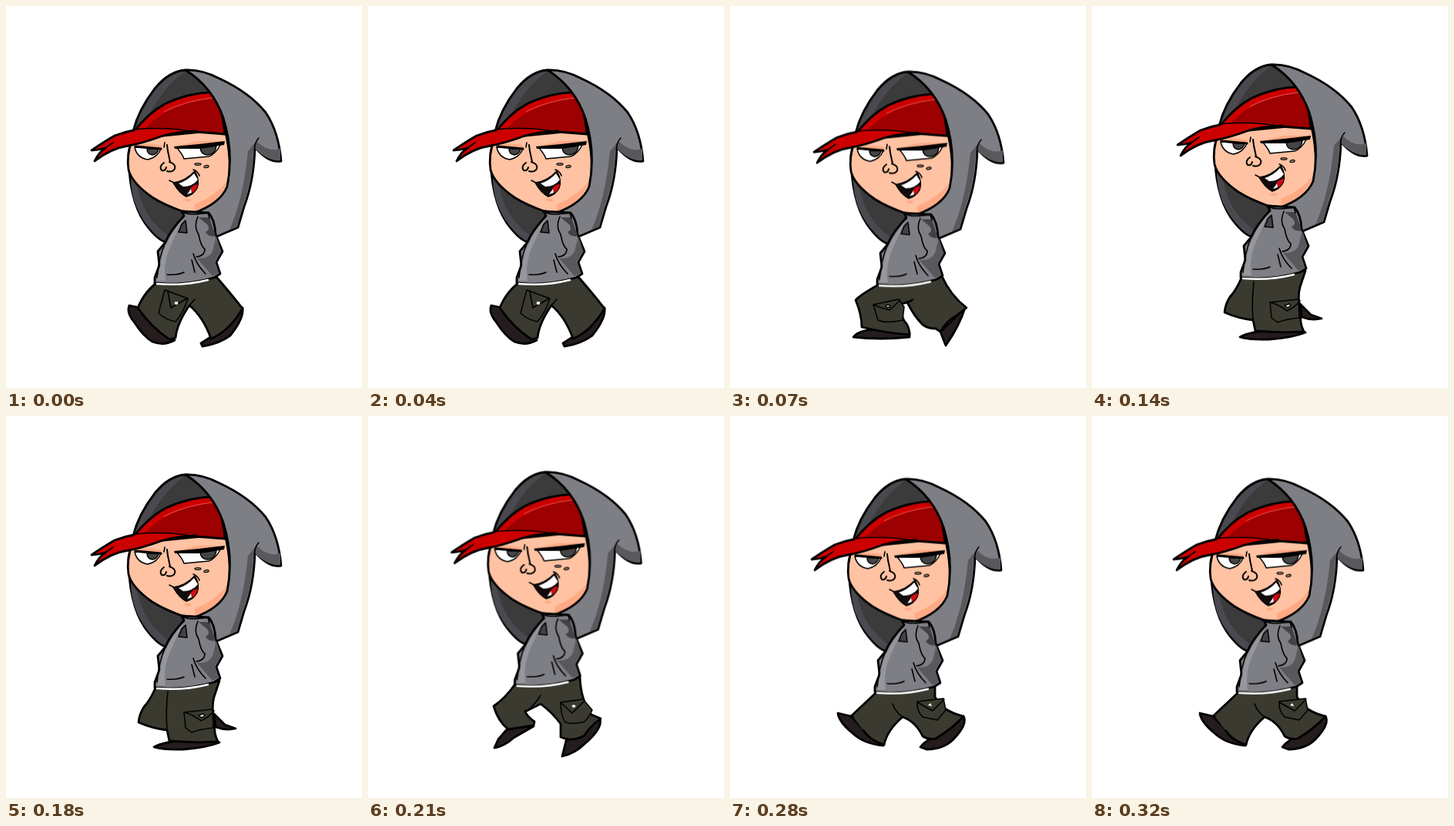
An HTML page that plays this animation: 462 px wide and 495 px high, repeating every 350 ms.

```html
<!DOCTYPE html>
<html lang="en">
<head>
<meta charset="utf-8">
<title>Walk cycle</title>
<style>
html, body { margin: 0; width: 100%; height: 100%; overflow: hidden; background: #fff; }
svg { display: block; }
path, ellipse { stroke-linejoin: round; stroke-linecap: round; }
.ink { stroke: #000; stroke-width: 2.8; }
.thin { stroke: #000; stroke-width: 1.5; }
.line { fill: none; stroke: #000; stroke-width: 1.6; }
.pants { fill: #3b3a30; }
.shoe { fill: #251c1e; }
.cloth { fill: #7e7e85; }
.shade { fill: #59595d; }
.skin { fill: #ffc2a2; }
.blush { fill: #ffa985; }
.white { fill: #fff; }
.red { fill: #cc0000; }
.dark-red { fill: #9c0000; }

.body { animation: bob 350ms step-end infinite; }
@keyframes bob {
  0% { transform: translate(0, 0); }
  20% { transform: translate(-2px, 2.3px); }
  40% { transform: translate(0, -7px); }
  60% { transform: translate(-2.5px, -10.3px); }
  80% { transform: translate(-5px, -1.3px); }
}
.pose { opacity: 0; animation: show 350ms step-end infinite; animation-delay: calc((var(--i) - 5) * 70ms); }
@keyframes show {
  0% { opacity: 1; }
  20%, 100% { opacity: 0; }
}
</style>
</head>
<body>
<svg width="462" height="495" viewBox="0 0 462 495">

  <!-- legs: wide stride -->
  <g class="pose" style="--i:0">
    <path class="shoe ink" d="M160 388Q156 397 166 409Q178 428 190 435Q205 441 219 433L212 428L174 391Z"/>
    <path class="shoe ink" d="M307 391Q309 405 291 427Q276 438 255 441L253 437L267 428Z"/>
    <path class="pants ink" d="M197 358Q181 368 171 391Q188 416 212 432L220 430Q222 411 238 388Q256 403 266 431Q289 422 307 392Q292 373 273 351L250 353Z"/>
    <path class="line" d="M238 388L245 380"/>
    <path class="pants thin" d="M206 368L236 379Q230 398 220 409Q208 407 198 398Z"/>
    <path class="line" d="M210 370L214 391L235 379"/>
    <ellipse class="white" cx="221" cy="385" rx="2.4" ry="2"/>
  </g>

  <!-- legs: heel down -->
  <g class="pose" style="--i:1">
    <path class="shoe ink" d="M305 391Q298 414 280 440L273 422L288 408Z"/>
    <path class="pants ink" d="M275 350Q286 375 307 391L294 401Q281 408 273 422L267 418Q257 418 250 413Q239 402 230 384L230 362Z"/>
    <path class="shoe ink" d="M160 429Q168 418 205 418L233 423V429Q195 433 160 429Z"/>
    <path class="pants ink" d="M193 361Q171 373 163 381Q171 400 171 416Q203 424 233 426Q233 415 226 408Q219 393 222 386Q242 382 272 360L270 350Z"/>
    <path class="pants" d="M250 356L273 353L280 374L236 384Z"/>
    <path class="pants thin" d="M186 387L219 380L226 390L224 407Q203 412 192 407Z"/>
    <path class="line" d="M186 387Q197 392 207 394L221 381"/>
    <ellipse class="white thin" cx="205" cy="389" rx="2.8" ry="1.5"/>
  </g>

  <!-- legs: passing -->
  <g class="pose" style="--i:2">
    <path class="shoe ink" d="M270 386L284 400L298 405Q285 408 272 403Z"/>
    <path class="shoe ink" d="M192 429Q204 422 240 419L277 423Q260 430 230 432Q206 433 192 429Z"/>
    <path class="pants ink" d="M194 352Q188 367 179 377Q173 386 172 397Q190 405 209 407L212 421Q245 424 275 422Q269 410 271 397Q266 377 270 364L277 343Z"/>
    <path class="line" d="M210 357Q207 382 209 407"/>
    <path class="pants thin" d="M231 384L268 380L269 404Q250 406 241 410L233 404Z"/>
    <path class="line" d="M231 384Q243 387 253 395Q264 390 270 382"/>
    <path class="white thin" d="M250 388L256 386L258 388L254 391Z"/>
  </g>

  <!-- legs: push off -->
  <g class="pose" style="--i:3">
    <path class="shoe ink" d="M182 404L169 419L164 430Q177 428 189 417L215 402Z"/>
    <path class="pants ink" d="M192 346Q178 366 163 376Q169 396 182 406L215 401L216 396Q206 389 204 383Q220 374 235 360Z"/>
    <path class="shoe ink" d="M301 392Q305 405 281 425Q269 437 252 441L257 421Z"/>
    <path class="pants ink" d="M204 383L224 373Q240 385 250 399V416Q264 423 281 414Q286 404 302 392L290 387Q276 368 275 338L225 346Z"/>
    <path class="pants" d="M193 350L240 349L224 372L205 381L184 374Z"/>
    <path class="line" d="M205 383Q216 375 224 362"/>
    <path class="pants thin" d="M250 371L279 367L291 381Q286 392 281 396Q267 400 256 397Q250 388 250 371Z"/>
    <path class="line" d="M251 372L265 385L281 369"/>
    <ellipse class="white" cx="267" cy="376" rx="2.4" ry="1.8"/>
  </g>

  <!-- legs: landing -->
  <g class="pose" style="--i:4">
    <path class="shoe ink" d="M140 385Q141 396 159 411Q174 425 199 427L172 405L157 389Z"/>
    <path class="shoe ink" d="M247 429Q254 420 267 415L303 389Q309 399 290 419Q277 432 255 432Z"/>
    <path class="pants ink" d="M190 358Q173 374 157 389Q173 395 172 405Q180 420 200 426Q204 407 224 390Q241 396 250 415Q258 420 267 418Q290 404 303 389Q276 383 266 364V348Z"/>
    <path class="pants" d="M160 390L176 384L184 410L172 406Z"/>
    <path class="line" d="M224 390Q215 384 211 373"/>
    <path class="pants thin" d="M243 370L277 366L280 381L269 394L250 390Q242 382 243 370Z"/>
    <path class="line" d="M243 371Q254 377 263 382L278 367"/>
    <path class="white" d="M257 375L260 372L262 376Z"/>
  </g>

  <g class="body">
    <!-- hood lining -->
    <path class="ink" fill="#3b3b3c" d="M233 83Q212 84 193 107Q172 134 165 162L159 190Q159 250 180 281Q195 302 207 306L232 270L270 260L288 160Q268 100 233 83Z"/>
    <path fill="#49494f" d="M232 85Q212 87 194 109Q175 135 169 156Q183 145 192 130Q208 102 232 85ZM162 222Q162 258 184 285Q197 301 206 304L210 297Q178 274 171 236Z"/>

    <!-- face -->
    <path class="skin ink" d="M164 172Q156 194 159 212Q163 229 190 248Q206 258 229 266L246 268Q277 257 288 235Q294 200 284 160Z"/>
    <path class="blush" d="M288 226Q272 246 245 257V266Q277 257 288 226ZM230 251Q236 248 241 251Q237 256 230 251ZM166 181Q185 176 202 181L200 186H168ZM222 181L250 175L280 175V179Z"/>

    <!-- eyes -->
    <path class="white thin" d="M167 183L201 185Q197 196 184 199Q170 197 167 183Z"/>
    <path class="thin" fill="#454545" d="M183 185H198Q197 192 190 193Q183 192 183 185Z"/>
    <path class="white thin" d="M222 184L278 180Q272 192 263 195L231 198Q229 192 222 184Z"/>
    <path class="thin" fill="#454545" d="M252 184L273 181Q272 192 262 193Q253 193 252 184Z"/>
    <path class="line" style="stroke-width:3" d="M168 182L201 185"/>
    <path d="M218 182L250 179L284 175L283 180L250 185L219 185Z"/>
    <path class="line" d="M206 177L205 183"/>
    <path class="line" style="stroke-width:2" d="M209 180L210 188L213 202M205 203Q198 208 202 213Q207 214 208 209M212 202Q221 205 219 211Q216 216 209 214"/>

    <!-- mouth and freckles -->
    <path class="thin" fill="#120b0b" d="M217 229Q233 227 245 214Q252 226 248 236Q243 245 234 247Q225 243 217 229Z"/>
    <path class="white" d="M224 230Q236 226 244 217L249 225Q242 234 230 234Z"/>
    <path fill="#d00a12" d="M239 237Q243 231 249 231Q248 238 242 242Z"/>
    <path class="white" d="M235 244L240 237L241 242Z"/>
    <path class="line" d="M243 212Q249 214 251 220M212 226L218 229"/>
    <g fill="#b08a70" stroke="#111" stroke-width="1.3">
      <ellipse cx="249" cy="205" rx="4" ry="1.3"/>
      <ellipse cx="260" cy="208" rx="3.200" ry="1.5" transform="rotate(-12 260 208)"/>
    </g>

    <!-- cap -->
    <path class="ink dark-red" d="M166 163Q184 139 206 127Q237 112 270 112Q281 132 284 166L245 163Z"/>
    <path class="red" d="M169 161Q187 140 208 128Q238 114 269 113L270 119Q210 126 180 159Z"/>
    <path fill="none" stroke="#ef6a62" stroke-width=".8" d="M205 137Q232 123 268 119"/>
    <path class="red" d="M111 187Q127 176 141 168Q169 158 205 158Q228 158 246 162Q224 163 204 168Q177 178 159 181Q137 184 115 201Q121 189 129 184Q118 187 111 187Z"/>
    <path class="ink" fill="none" d="M166 161Q154 163 141 168Q127 176 111 187Q118 187 129 184Q121 189 115 201Q137 184 159 181Q177 178 204 168Q224 163 246 162"/>
    <path class="line" d="M129 184L139 177M166 160Q205 156 246 163"/>

    <!-- hood -->
    <path class="cloth ink" d="M233 83Q254 82 277 94Q316 112 337 138Q354 163 357 201Q341 204 323 183Q322 226 309 260L301 287L273 299L250 285L244 268Q278 256 287 234Q296 190 282 145Q268 105 233 83Z"/>
    <path class="shade" d="M325 175Q340 190 356 185V200Q340 202 321 183Q320 226 307 259L300 286L290 290Q308 250 314 188Z"/>
    <path class="line" d="M328 171Q321 178 323 190"/>

    <!-- torso -->
    <path class="cloth ink" d="M207 306L197 318L199 336L193 352V359Q230 363 270 352L278 347L273 332L281 318L272 296Q271 277 263 268L228 266L231 272Q213 291 207 306Z"/>
    <path fill="#96969d" d="M230 275Q213 295 204 318L196 356L207 356Q203 334 214 310Z"/>
    <path class="shade" d="M273 298L279 318L271 331L276 346L268 350L248 327Q263 328 268 318Z"/>
    <path fill="none" stroke="#fff" stroke-width="2.4" d="M196 360Q230 363 262 355"/>
    <path class="thin" fill="#434347" d="M233 278L235 294L224 293L228 283Z"/>
    <path fill="#434347" d="M250 274L264 274L272 298Q263 300 259 293Q266 289 261 283Z"/>
    <path class="line" d="M249 273Q243 286 250 296Q253 312 258 315Q258 324 247 325M243 321Q247 335 259 347M241 329L245 345M209 348Q223 349 231 345M207 306Q198 326 196 352"/>
    <path class="line" d="M229 267Q238 272 262 268L264 275"/>
  </g>
</svg>
</body>
</html>
```
